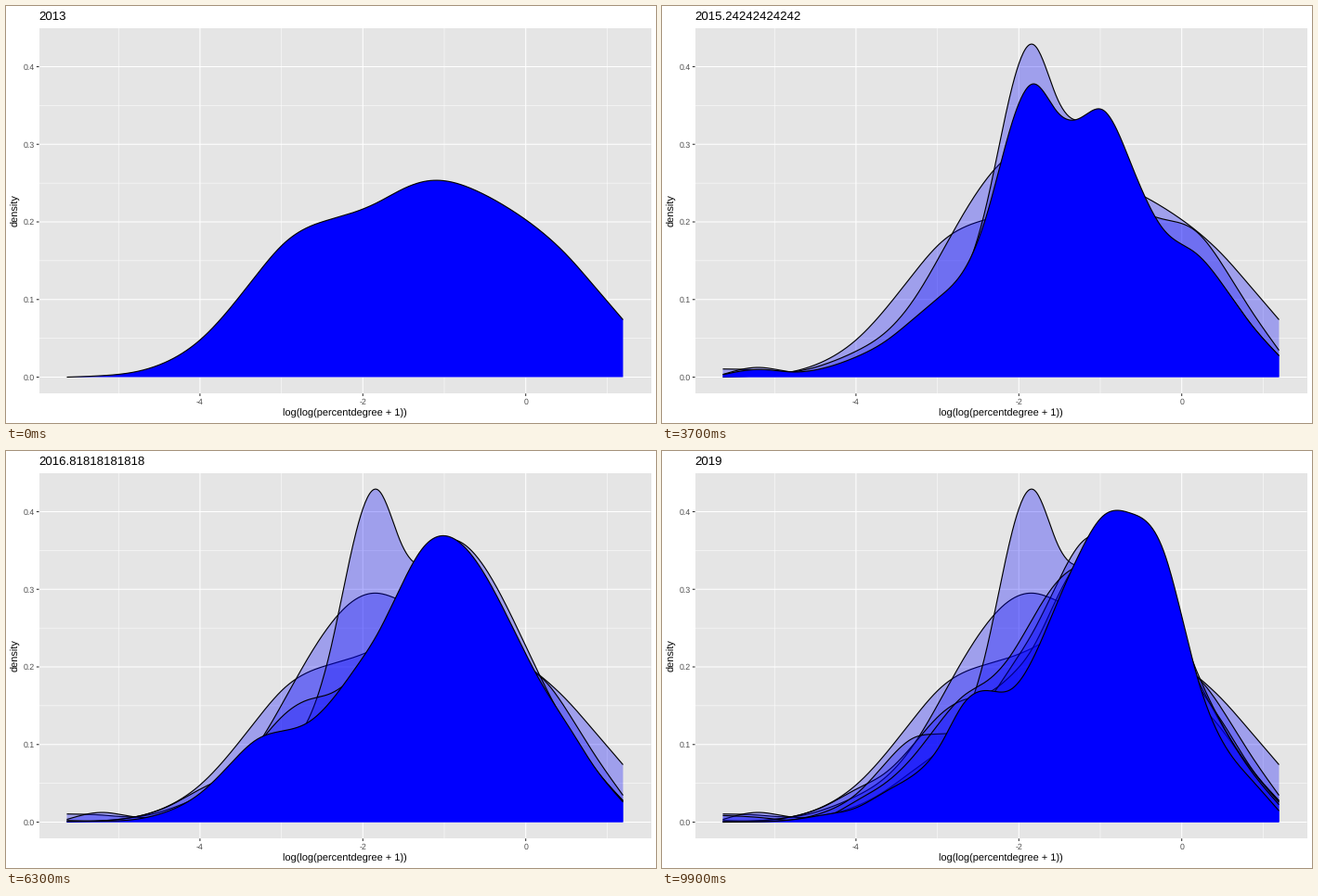
A matplotlib script that plays this animation: 700x450 px, repeating every 10 s.

```python
import numpy as np
import matplotlib.pyplot as plt
from matplotlib.animation import FuncAnimation

plt.rcParams["font.family"] = "Liberation Sans"
plt.rcParams["text.hinting"] = "none"

W, H, FRAMES = 700, 450, 100
PX = 0.72  # points per pixel at 100 dpi
LEFT, RIGHT, TOP, BOTTOM = 35.6, 694.5, 23.6, 418.2
BASE, Y_UNIT = 400.5, 837.5
X_ZERO, X_UNIT = 559.7, 87.7

# Frame at which each year from 2013 to 2019 is reached
KEYS = np.array([0, 17, 33, 49, 66, 83, 99])

# Density of each year at the knots, in thousandths
KNOTS = np.array([65.5, 105, 140, 175, 210, 240, 270, 300, 325, 350, 375,
                  400, 425, 450, 475, 505, 540, 575, 605, 635, 664.5])
DENSITY = np.array([
    [0, 2, 7, 21, 49, 87, 132, 173, 193, 203.5, 212.5,
     225, 241, 252, 252.5, 241, 218.5, 189, 156, 115, 74],
    [10.5, 9, 7, 16.5, 34, 57, 98, 158, 211, 256, 286,
     295, 285.5, 271.5, 252.5, 222.5, 203.5, 188, 142, 85, 34.5],
    [3.5, 12.5, 6.5, 9, 21, 40, 66, 93, 131, 225, 364,
     428.5, 361, 331.5, 337.5, 252, 162, 150, 116, 67, 27.5],
    [2, 2, 7, 20.5, 43, 63, 99, 139, 157.5, 166, 188,
     226, 288, 340, 364, 345, 276, 188.5, 121, 68, 27.5],
    [1, 1, 3, 13, 37, 75, 108, 113.5, 122, 154, 198,
     246, 306, 358, 369.5, 337, 262, 181, 126, 69, 25.5],
    [8.5, 6, 2, 6, 28, 50, 84, 130, 163, 182, 214,
     264, 309, 330, 332, 339, 297, 197, 122, 65, 22.5],
    [0, 0.5, 3, 9.5, 19, 39, 60, 100, 153, 169.5, 170.5,
     212, 281, 347, 394.5, 398, 350, 193, 101, 54.5, 14.5],
]) / 1000


def spline(xs, ys, x):
    """Natural cubic spline through (xs, ys)."""
    n, h = len(xs), np.diff(xs)
    slope = np.diff(ys) / h
    a, b = np.eye(n), np.zeros(n)
    for i in range(1, n - 1):
        a[i, i - 1:i + 2] = h[i - 1], 2 * (h[i - 1] + h[i]), h[i]
        b[i] = 6 * (slope[i] - slope[i - 1])
    m = np.linalg.solve(a, b)
    k = np.clip(np.searchsorted(xs, x) - 1, 0, n - 2)
    d = x - xs[k]
    lin = slope[k] - h[k] * (2 * m[k] + m[k + 1]) / 6
    return ys[k] + d * (lin + d * (m[k] / 2 + d * (m[k + 1] - m[k]) / (6 * h[k])))


xs = np.linspace(KNOTS[0], KNOTS[-1], 512)
curves = [np.maximum(spline(KNOTS, row, xs), 0) for row in DENSITY]

fig = plt.figure(figsize=(W / 100, H / 100), dpi=100, facecolor="white")
ax = fig.add_axes([0, 0, 1, 1])
ax.set(xlim=(0, W), ylim=(H, 0))
ax.axis("off")


def segment(x, y, color, width, z):
    ax.plot(x, y, color=color, lw=width * PX, zorder=z, snap=False,
            solid_capstyle="butt")


def label(x, y, text, size, color="black", **kw):
    return ax.text(x, y, text, fontsize=size * PX, color=color,
                   va="baseline", **kw)


def outline(ys):
    y = BASE - ys * Y_UNIT
    return np.column_stack([np.r_[xs, xs[-1], xs[0]], np.r_[y, BASE, BASE]])


def area(ys, alpha, z):
    pts = outline(ys)
    fill, = ax.fill(*pts.T, color="blue", alpha=alpha, lw=0, zorder=z)
    line, = ax.plot(*pts[:-2].T, color="black", lw=1.15 * PX, zorder=z + 0.5,
                    snap=False, solid_capstyle="butt")
    return fill, line


# Panel, grid and axes
ax.fill([LEFT, RIGHT, RIGHT, LEFT], [TOP, TOP, BOTTOM, BOTTOM],
        color="#e5e5e5", lw=0, zorder=0)
for v in range(-5, 2):
    x = X_ZERO + v * X_UNIT
    major = v % 2 == 0
    segment([x, x], [TOP, BOTTOM], "white", 1.07 if major else 0.53, 1)
    if major:
        segment([x, x], [BOTTOM, BOTTOM + 2.75], "#333333", 1.07, 1)
        label(x, 429.8, str(v), 8.8, "#4d4d4d", ha="center")
for k in range(9):
    y = BASE - k * 0.05 * Y_UNIT
    major = k % 2 == 0
    segment([LEFT, RIGHT], [y, y], "white", 1.07 if major else 0.53, 1)
    if major:
        segment([LEFT - 2.75, LEFT], [y, y], "#333333", 1.07, 1)
        label(30.8, y + 3.2, f"{k * 0.05:.1f}", 8.8, "#4d4d4d", ha="right")
label(365, 443, "log(log(percentdegree + 1))", 11, ha="center")
label(13.2, 221, "density", 11, ha="center", rotation=90,
      rotation_mode="anchor")
title = label(35.3, 15, "", 13.2, ha="left")

shadows = [area(c, 0.3, 2 + j) for j, c in enumerate(curves[:-1])]
fill, line = area(curves[0], 1, 10)


def update(i):
    k = min(np.searchsorted(KEYS, i, side="right") - 1, len(KEYS) - 2)
    t = (i - KEYS[k]) / (KEYS[k + 1] - KEYS[k])
    pts = outline(curves[k] + t * (curves[k + 1] - curves[k]))
    fill.set_xy(pts)
    line.set_data(*pts[:-2].T)
    for key, parts in zip(KEYS, shadows):
        for part in parts:
            part.set_visible(bool(key < i))
    title.set_text(f"{2013 + 6 * i / (FRAMES - 1):.15g}")
    return [fill, line, title]


anim = FuncAnimation(fig, update, frames=FRAMES, interval=100, repeat=True,
                     repeat_delay=0, blit=False)
plt.show()
```
